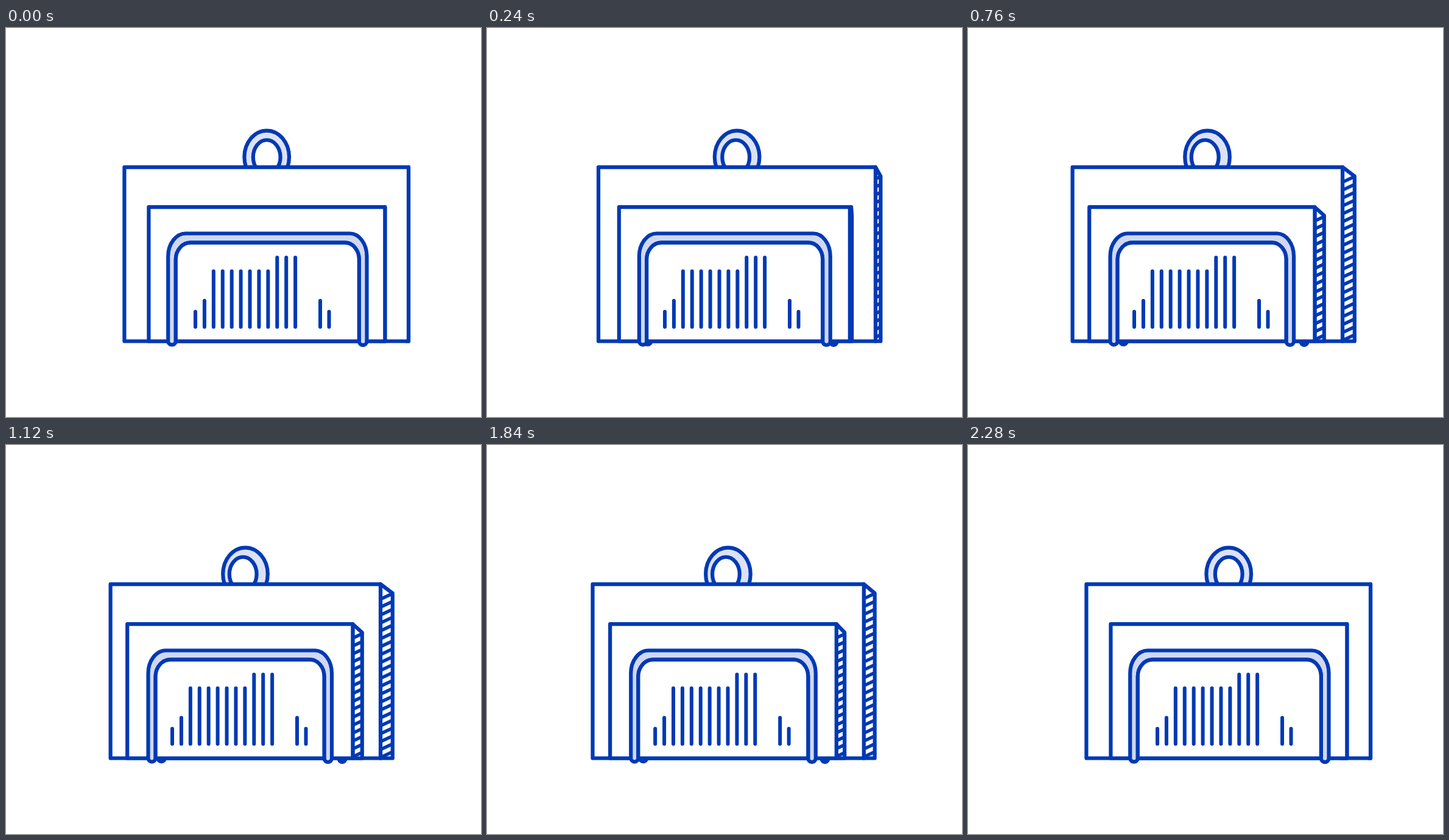
An HTML page for the animation above (3.6 s loop, 780 px wide and 639 px high).

```html
<!DOCTYPE html>
<html lang="en">
<head>
<meta charset="utf-8">
<title>Folding box</title>
<style>
  html, body { margin: 0; width: 100%; height: 100%; overflow: hidden; background: #fff; }
  svg { display: block; width: 100vw; height: 100vh; }
  path { fill: none; stroke: #0039b4; stroke-width: 6.2; stroke-linecap: round; stroke-linejoin: round; }
  .white { fill: #fff; }
  .solid { fill: #0039b4; }
  .ring { fill: #dbe2f6; }
  .handle { fill: #d0d8f1; }
  .hatch { stroke-width: 5.4; stroke-linecap: butt; }
  .bars { stroke-width: 6; }
</style>
</head>
<body>
<svg id="stage" viewBox="0 0 780 639"></svg>
<script>
const LOOP = 3600, STEP = 40, MOVE = 480, BACK = 1800;
const FLOOR = 514.5;
const stage = document.getElementById('stage');

function layer(className) {
  const path = document.createElementNS('http://www.w3.org/2000/svg', 'path');
  path.setAttribute('class', className);
  stage.append(path);
  return d => path.setAttribute('d', d);
}

const draw = {
  ringOuter: layer('ring'),
  ringInner: layer('white'),
  backFeet: layer('solid'),
  outerSide: layer('white'),
  outerHatch: layer('hatch'),
  outerFront: layer('white'),
  innerSide: layer('white'),
  innerHatch: layer('hatch'),
  innerFront: layer('white'),
  handle: layer('handle'),
  opening: layer('white'),
  bars: layer('bars')
};

const ellipse = (cx, cy, rx, ry) =>
  `M${cx - rx} ${cy}a${rx} ${ry} 0 1 1 ${2 * rx} 0a${rx} ${ry} 0 1 1 ${-2 * rx} 0Z`;

const box = (left, top, right) => `M${left} ${top}H${right}V${FLOOR}H${left}Z`;

const side = (topX, top, left, right, rightTop) =>
  `M${topX} ${top}L${right} ${rightTop}V${FLOOR}H${left}V${top}Z`;

function hatch(left, right, start) {
  const drop = Math.max(0, right - left) * 0.47;
  let d = '';
  for (let y = start; y + drop < 517; y += 13) d += `M${left} ${y + drop}L${right} ${y}`;
  return d;
}

function bars() {
  const tops = [466, 448, ...Array(7).fill(399.5), ...Array(3).fill(377)];
  const bar = (x, top) => `M${x} ${top}V491`;
  return tops.map((top, i) => bar(311 + 14.92 * i, top)).join('') + bar(516, 448) + bar(530.5, 466);
}
draw.bars(bars());

// Outline of the handle: two legs with round feet joined by an arch.
function handleShape(p) {
  const ol = 266.2 - 32.7 * p, or = 592.5 - 57.5 * p;
  const il = 278.8 - 33.2 * p, ir = 579.8 - 57.3 * p;
  const foot = (from, to, depth) => `A${(from - to) / 2} ${depth} 0 0 1 ${to} ${FLOOR}`;
  const arch = `M${il} ${FLOOR}V380A24 27.5 0 0 1 ${il + 24} 352.7H${ir - 23}A23 27.5 0 0 1 ${ir} 380V${FLOOR}`;
  return {
    opening: arch + 'Z',
    outline: `M${ol} ${FLOOR}V375A29 37.5 0 0 1 ${ol + 29} 337.5H${or - 28}A28 37.5 0 0 1 ${or} 375V${FLOOR}` +
      foot(or, ir, 6.3) + `V380A23 27.5 0 0 0 ${ir - 23} 352.7H${il + 24}A24 27.5 0 0 0 ${il} 380V${FLOOR}` +
      foot(il, ol, 5.8) + 'Z'
  };
}

function progress(t) {
  if (t < MOVE) return t / MOVE;
  return t < BACK ? 1 : Math.max(0, 1 - (t - BACK) / MOVE);
}

function render(time) {
  const t = Math.floor((time % LOOP) / STEP) * STEP;
  const p = progress(t);

  draw.ringOuter(ellipse(428.2 - 35.2 * p, 212, 36.8, 43.4));
  draw.ringInner(ellipse(428.2 - 39 * p, 212, 22.4, 28));

  const foot = ellipse;
  draw.backFeet(foot(272.4 - 17.2 * p, 515, 5.6, 5) + foot(586.1 - 34 * p, 515, 5.6, 5.8));

  const outerRight = 661 - 46 * p, outerEdge = 658 - 23.2 * p;
  draw.outerSide(side(outerRight, 228.6, outerRight, outerEdge, 243.5));
  draw.outerHatch(hatch(outerRight, outerEdge, 244));
  draw.outerFront(box(194.4 - 22.8 * p, 228.6, outerRight));

  const innerRight = 622.3 - 52.9 * p, innerEdge = 613.5 - 28.7 * p;
  const lag = t < MOVE ? 2.3 * Math.sin(Math.PI * p) : 0;
  const drift = Math.min(1, Math.max(0, (t - MOVE) / (BACK - MOVE))) - 0.5;
  draw.innerSide(side(innerRight + lag, 294.2, innerRight, innerEdge, 308));
  draw.innerHatch(hatch(innerRight, innerEdge, 310 + drift));
  draw.innerFront(box(234.4 - 35.2 * p, 294.2, innerRight));

  const { outline, opening } = handleShape(p);
  draw.handle(outline);
  draw.opening(opening);
  stage.lastChild.setAttribute('transform', `translate(${-38 * p} 0)`);
}

let start;
function tick(now) {
  start ??= now;
  render(now - start);
  requestAnimationFrame(tick);
}
render(0);
requestAnimationFrame(tick);
</script>
</body>
</html>
```
